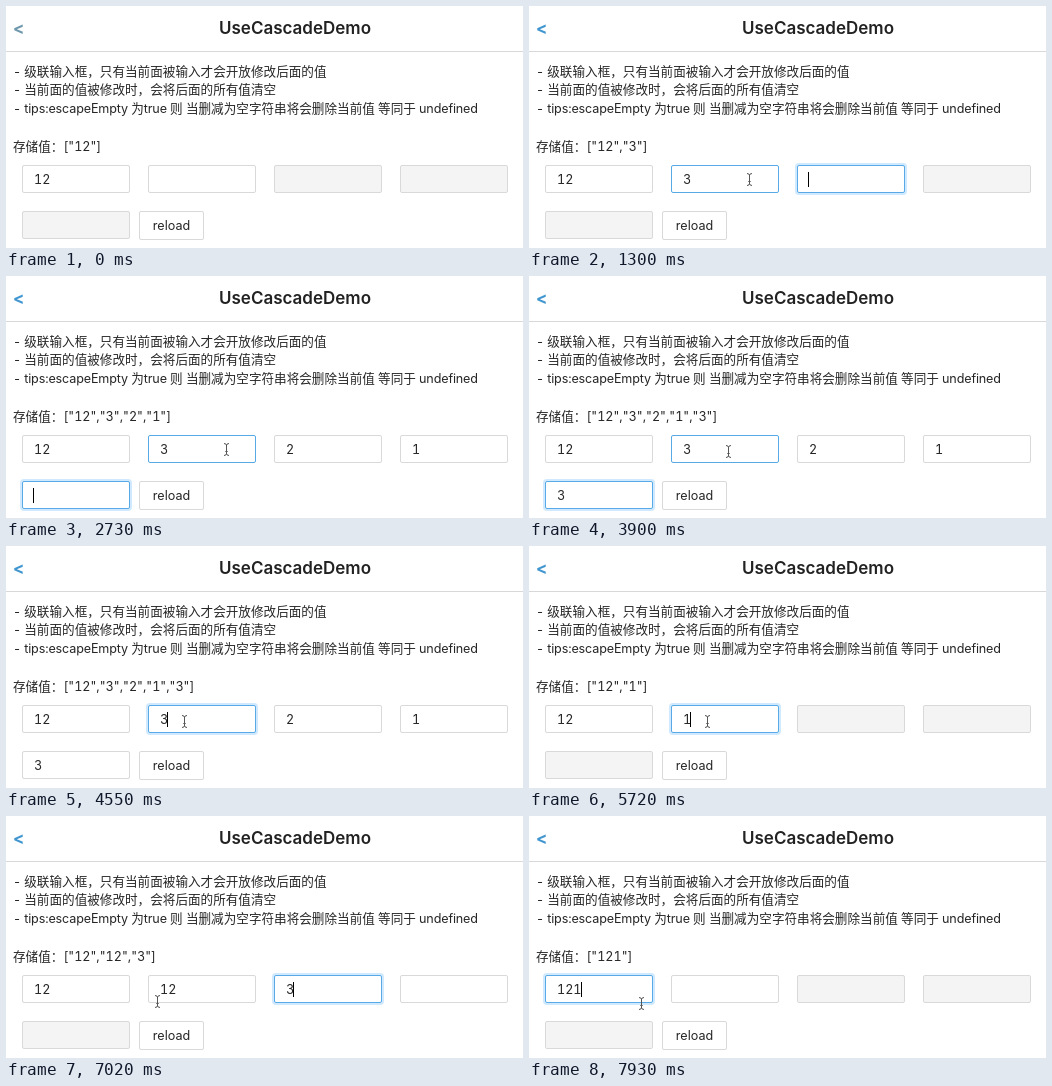
Recreate the animation shown at these times as an HTML page. Size 517 by 242 pixels, loop 8 s.

```html
<!DOCTYPE html>
<html lang="zh-CN">
<head>
<meta charset="utf-8">
<title>UseCascadeDemo</title>
<style>
html, body { margin: 0; width: 100%; height: 100%; overflow: hidden; background: #fff; }
#stage {
  position: relative; width: 517px; height: 242px; overflow: hidden; background: #fff;
  color: #262626; font: 12.6px/19px Inter, "Noto Sans CJK SC", "Noto Sans CJK", sans-serif;
  font-variant-numeric: tabular-nums;
}
#stage > * { position: absolute; box-sizing: border-box; white-space: pre; }
header { left: 0; top: 0; width: 517px; height: 46px; border-bottom: 1px solid #d8d8d8; }
h1 { margin: 0; left: 213px; top: 0; font-size: 17px; line-height: 44px; font-weight: 600; color: #222; }
#back { left: 7px; top: 0; font-size: 17px; line-height: 44px; font-weight: 700; }
.line { left: 7px; }
.line span { letter-spacing: -.15px; }
.line #stored { letter-spacing: 0; }
.cell, .reload { border: 1px solid #d9d9d9; border-radius: 2px; line-height: 27px; }
.cell { width: 108px; height: 28px; padding-left: 11px; }
.cell i { display: inline-block; width: 1px; height: 15px; margin: 0 0 0 -1px; background: #000; vertical-align: -3px; }
.reload { left: 133px; top: 205px; width: 65px; height: 29px; text-align: center; }
#cursor { width: 9px; height: 15px; }
</style>
</head>
<body>
<div id="stage">
  <header></header>
  <div id="back">&lt;</div>
  <h1>UseCascadeDemo</h1>
  <div class="line" style="top:55.5px"><span>- </span>级联输入框，只有当前面被输入才会开放修改后面的值</div>
  <div class="line" style="top:74px"><span>- </span>当前面的值被修改时，会将后面的所有值清空</div>
  <div class="line" style="top:93px"><span>- tips:escapeEmpty </span>为<span>true </span>则<span> </span>当删减为空字符串将会删除当前值<span> </span>等同于<span> undefined</span></div>
  <div class="line" style="top:131px">存储值：<span id="stored"></span></div>
  <div class="reload">reload</div>
  <svg id="cursor" viewBox="0 0 9 15" fill="none">
    <path d="M2 1.5Q4.5 1.5 4.5 3.5Q4.5 1.5 7 1.5M4.5 3V12M2 13.5Q4.5 13.5 4.5 11.5Q4.5 13.5 7 13.5M3.3 9.5H5.7" stroke="#555"/>
  </svg>
</div>
<script>
const LOOP = 8000, TICK = 130, FADE = 300, BLINK = 520;
const $ = id => document.getElementById(id);
const stage = $('stage'), stored = $('stored'), cursor = $('cursor'), back = $('back');

// time, values, focused cell
const steps = [
  [0, ['12'], -1],
  [520, ['12'], 1],
  [780, ['12', '3'], 1],
  [1040, ['12', '3'], 2],
  [1560, ['12', '3', '2'], 2],
  [1820, ['12', '3', '2'], 3],
  [2080, ['12', '3', '2', '1'], 3],
  [2470, ['12', '3', '2', '1'], 4],
  [2990, ['12', '3', '2', '1', '3'], 4],
  [4160, ['12', '3', '2', '1', '3'], 1],
  [4810, ['12'], 1],
  [5720, ['12', '1'], 1],
  [5980, ['12', '12'], 1],
  [6370, ['12', '12'], 2],
  [6630, ['12', '12', '3'], 2],
  [7540, ['12', '12', '3'], 0],
  [7800, ['121'], 0]
];

// time, x, y of the pointer
const path = [
  [130, 212, 218], [520, 220, 173], [3770, 220, 173], [3900, 199, 175],
  [4160, 178, 175], [5980, 178, 175], [6370, 165, 197], [6760, 151, 185],
  [7020, 151, 185], [7410, 112, 187], [LOOP, 112, 187]
];

const cells = Array.from({ length: 5 }, (_, i) => {
  const el = document.createElement('div');
  const text = document.createElement('span'), caret = document.createElement('i');
  const x = 16 + 126 * (i % 4), y = i < 4 ? 159 : 205;
  el.className = 'cell';
  el.style.left = x + 'px';
  el.style.top = y + 'px';
  el.append(text, caret);
  stage.insertBefore(el, cursor);
  return { el, text, caret, x, y };
});

function pointer(t) {
  const k = path.findIndex(p => p[0] > t);
  if (k < 1) return null;
  const [t0, x0, y0] = path[k - 1], [t1, x1, y1] = path[k];
  const f = (t - t0) / (t1 - t0);
  return { x: x0 + (x1 - x0) * f, y: y0 + (y1 - y0) * f };
}

function render(time) {
  const t = Math.floor(time / TICK) * TICK;
  const past = steps.filter(s => s[0] <= t);
  const [since, values, focus] = past[past.length - 1];
  const caretOn = Math.floor((t - since) / BLINK) % 2 === 0;
  const p = pointer(t);

  back.style.color = t < TICK ? '#6f98ad' : '#4196d0';
  stored.textContent = JSON.stringify(values);
  cursor.style.display = p ? '' : 'none';
  if (p) {
    cursor.style.left = Math.round(p.x) - 4 + 'px';
    cursor.style.top = Math.round(p.y) - 7 + 'px';
  }

  cells.forEach((c, i) => {
    // a cell opens once every cell before it holds a value
    let opened = null;
    for (const [at, v] of past) {
      if (v.length < i) opened = null;
      else if (opened === null) opened = at || -FADE;
    }
    const open = opened === null ? 0 : Math.min(1, (t - opened) / FADE);
    const shade = Math.round(244 + 11 * open);
    const hover = p && opened !== null && p.x > c.x && p.x < c.x + 108 && p.y > c.y && p.y < c.y + 25;
    const focused = i === focus;
    c.text.textContent = values[i] || '';
    c.caret.style.visibility = focused && caretOn ? 'visible' : 'hidden';
    c.el.style.background = `rgb(${shade},${shade},${shade})`;
    c.el.style.borderColor = focused || hover ? '#58aae6' : '#d9d9d9';
    c.el.style.boxShadow = focused ? '0 0 0 2px rgba(24,144,255,.2)' : 'none';
  });
}

const start = performance.now();
function loop() {
  render((performance.now() - start) % LOOP);
  requestAnimationFrame(loop);
}
loop();
</script>
</body>
</html>
```
